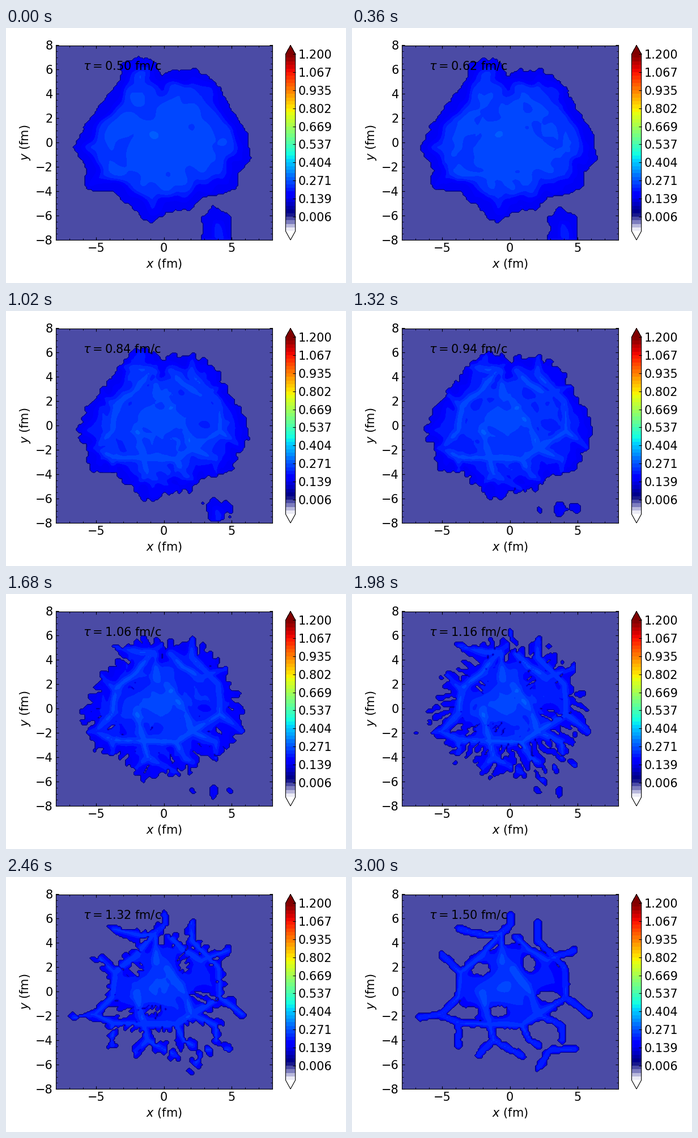
Animation of 600 by 450 pixels, one loop 3.06 s. Source, as a matplotlib script:

```python
import numpy as np
import matplotlib.pyplot as plt
from matplotlib.animation import FuncAnimation
from matplotlib.colors import LinearSegmentedColormap
from matplotlib.path import Path

FRAMES, STEP = 51, 60
plt.rcParams.update({
    "font.family": "DejaVu Sans", "font.size": 15,
    "xtick.direction": "in", "ytick.direction": "in",
    "xtick.top": True, "ytick.right": True,
})

# Fluid grid in fm, with stage pixel coordinates for the shapes
axis = np.linspace(-8, 8, 129)
GX, GY = np.meshgrid(axis, axis)
PX, PY = 279 + 23.87 * GX, 202.5 - 21.44 * GY

# Key points of the first outline
START = [
    (121, 210), (145, 166), (174, 128), (203, 92), (205, 66), (234, 51),
    (264, 61), (271, 85), (296, 76), (335, 74), (372, 98), (395, 140),
    (426, 188), (430, 235), (410, 256), (404, 286), (345, 299), (322, 321),
    (288, 322), (256, 346), (222, 315), (190, 289), (140, 285), (144, 250)]
START_SIDE = [(348, 390), (348, 335), (366, 315), (396, 333), (396, 390)]
# Threads of the late web
THREADS = [
    [(120, 248), (158, 242), (188, 212), (192, 168), (225, 143), (262, 100),
     (280, 86), (280, 68)],
    [(158, 136), (192, 170)],
    [(155, 242), (190, 258), (300, 262), (330, 242), (378, 212)],
    [(190, 92), (240, 104), (264, 100), (265, 150)],
    [(328, 80), (328, 112), (375, 160), (378, 212), (418, 243)],
    [(290, 106), (312, 128), (345, 147), (392, 130)],
    [(188, 258), (188, 297)],
    [(230, 205), (250, 288), (222, 315)],
    [(250, 288), (300, 315)],
    [(285, 162), (318, 208), (328, 243), (371, 262), (371, 287)],
    [(300, 262), (316, 290), (330, 297)],
    [(330, 336), (350, 305), (393, 304)]]
# Late voids: centre and radii
VOIDS = [(246, 121, 13, 10), (227, 163, 17, 12), (313, 153, 12, 15),
         (348, 211, 21, 11), (259, 237, 17, 10), (210, 238, 14, 11)]


def line_dist(pts):
    """Distance in pixels from every grid point to a polyline."""
    best = np.full(PX.shape, np.inf)
    for (x0, y0), (x1, y1) in zip(pts, pts[1:]):
        dx, dy = x1 - x0, y1 - y0
        u = ((PX - x0) * dx + (PY - y0) * dy) / (dx * dx + dy * dy)
        u = u.clip(0, 1)
        best = np.minimum(best, np.hypot(PX - x0 - u * dx, PY - y0 - u * dy))
    return best


def polygon(pts):
    """Signed distance to a polygon, positive inside."""
    inside = Path(pts).contains_points(np.c_[PX.ravel(), PY.ravel()])
    sign = np.where(inside.reshape(PX.shape), 1, -1)
    return sign * line_dist(pts + pts[:1])


def ellipse(x, y, rx, ry):
    return (1 - np.hypot((PX - x) / rx, (PY - y) / ry)) * min(rx, ry)


def gauss(x, y, r):
    return np.exp(-((PX - x) ** 2 + (PY - y) ** 2) / (2 * r * r))


rng = np.random.default_rng(11)


def waves(lo, hi, count=50):
    """Smooth noise of unit variance."""
    total = 0
    for _ in range(count):
        k = 2 * np.pi / rng.uniform(lo, hi)
        a, phase = rng.uniform(0, 2 * np.pi, 2)
        total = total + np.cos(k * (np.cos(a) * PX + np.sin(a) * PY) + phase)
    return total / np.sqrt(count / 2)


def rays(count=50):
    """Noise drawn out along the radius."""
    r, angle = np.hypot(PX - 275, PY - 203), np.arctan2(PY - 203, PX - 275)
    total = 0
    for _ in range(count):
        n, k = rng.integers(12, 50), 2 * np.pi / rng.uniform(20, 80)
        total = total + np.cos(n * angle + k * r * rng.choice([-1, 1])
                               + rng.uniform(0, 2 * np.pi))
    return total / np.sqrt(count / 2)


def mix(a, b, u):
    return (1 - u) * a + u * b


# Region shapes: early blob, eroded blob, late web
first = np.maximum(polygon(START), polygon(START_SIDE))
middle = np.minimum(first - 6, ellipse(275, 203, 150, 128))
middle = np.maximum(middle, ellipse(374, 350, 28, 8))
web = ellipse(280, 192, 95, 73)
for void in VOIDS:
    web = np.minimum(web, -ellipse(*void))
thread = np.min([line_dist(t) for t in THREADS], axis=0)
web = np.maximum(web, 5.5 - thread)
ridge = np.exp(-(thread / 6) ** 2)

edge = rays(), rays()
strands = waves(25, 70), waves(25, 70)
mottle = waves(30, 90)

# Early and late temperatures
warm = first - 23 + 3 * mottle
hot_start = np.where(warm > 0,
                     0.192 + 0.058 * (1 - np.exp(-warm.clip(0) / 10)),
                     0.192 + 0.003 * warm)
hot_start = (hot_start + 0.004 * mottle).clip(0.155)
hot_start += 0.016 * gauss(268, 205, 25) + 0.03 * gauss(238, 78, 12)
hot_end = (0.155 + 0.045 * (1 - np.exp(-web.clip(0) / 10)) + 0.045 * ridge
           + 0.05 * gauss(268, 195, 40)).clip(max=0.258)


def temperature(tau):
    s = tau - 0.5
    c, d = np.cos(1.2 * s), np.sin(1.2 * s)
    if tau < 0.94:
        shape = mix(first.clip(-25, 25), middle.clip(-25, 25), (s / 0.44) ** 2)
    else:
        late = 1 - ((1.5 - tau) / 0.56).clip(0, 1) ** 1.7
        shape = mix(middle.clip(-12, 12), web.clip(-12, 12), late)
    rough = np.interp(s, [0, 0.44, 0.74, 1], [1, 3, 4.5, 1])
    shape = shape + rough * (c * edge[0] + d * edge[1]).clip(-1.8, 1.8)

    temp = mix(hot_start, hot_end, s * s * (3 - 2 * s))
    glow = np.sin(np.pi * s)
    strand = 0.55 - np.abs(c * strands[0] + d * strands[1])
    temp = temp + glow * (0.018 * ridge + 0.01 * strand)
    return np.where(shape > 0, temp.clip(0.15), 0)


# White fading to navy, then the jet ramp
jet = plt.get_cmap("jet")
ramp = [(0.1 + 0.9 * p, jet(p)) for p in np.linspace(0, 1, 65)]
cmap = LinearSegmentedColormap.from_list("white_jet", [(0, "white")] + ramp)
levels = np.linspace(-0.1, 1.2, 50)

fig, ax = plt.subplots(figsize=(6, 4.5), dpi=100)


def plot(tau):
    return ax.contourf(GX, GY, temperature(np.float64(tau)), levels=levels,
                       cmap=cmap, extend="both")


cs = plot(0.5)
fig.colorbar(cs, ax=ax, ticks=levels[4::5], format="%.3f")
ax.set(xlim=(-8, 8), ylim=(-8, 8), xticks=[-5, 0, 5],
       yticks=range(-8, 9, 2), xlabel="$x$ (fm)", ylabel="$y$ (fm)")
ax.minorticks_on()
label = ax.text(-6, 6, "")
fig.tight_layout()


def draw(i):
    global cs
    tau = 0.5 + 0.02 * i
    cs.remove()
    cs = plot(tau)
    label.set_text(rf"$\tau={tau:.2f}$ fm/c")
    return []


anim = FuncAnimation(fig, draw, frames=FRAMES, interval=STEP, repeat=True,
                     repeat_delay=0, init_func=lambda: [])
plt.show()
```
